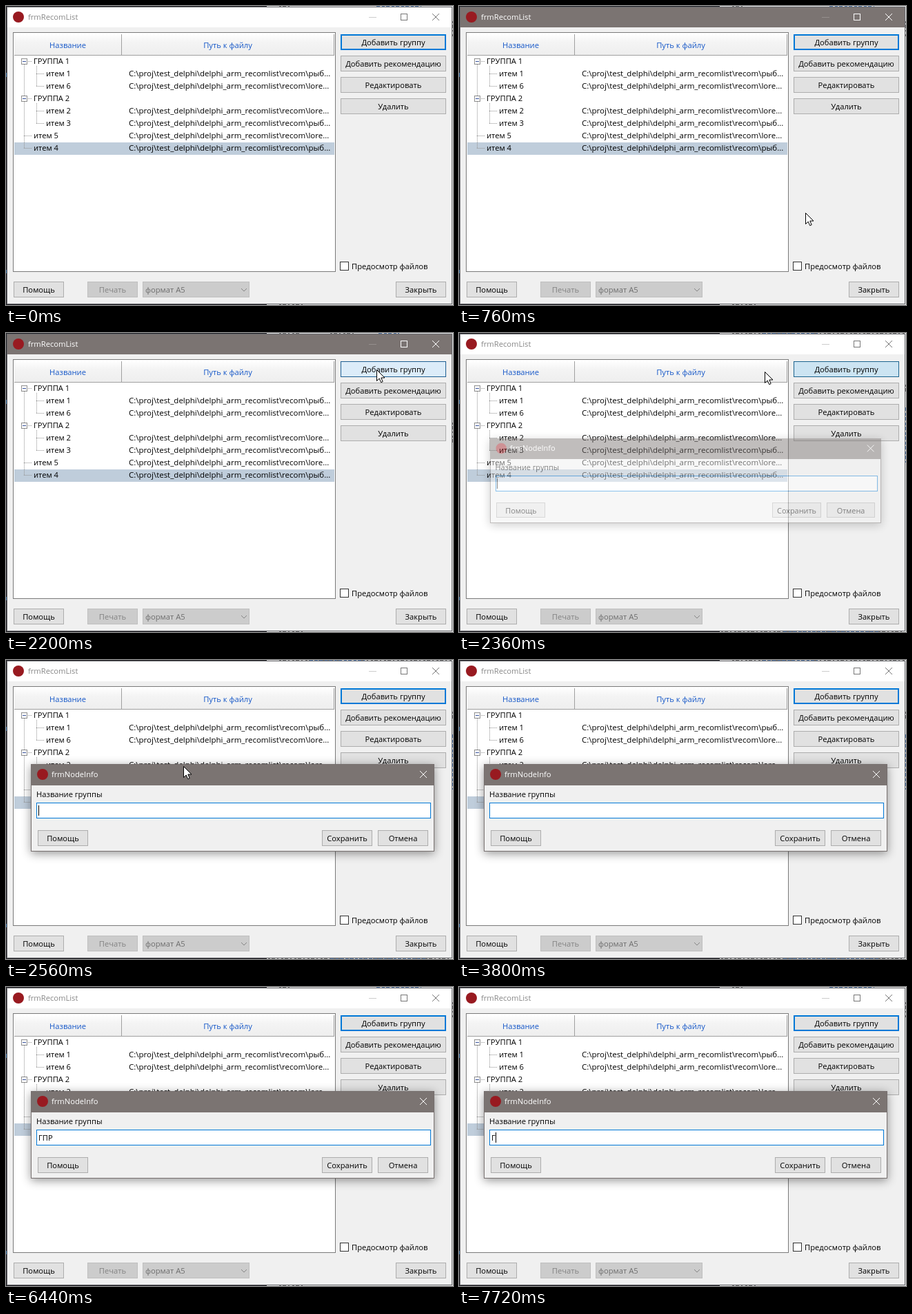
These frames come from a looping animation (648 by 434 pixels, 8 s). An HTML page:

```html
<!DOCTYPE html>
<html lang="ru">
<head>
<meta charset="utf-8">
<title>frmRecomList</title>
<style>
html, body { margin: 0; width: 100%; height: 100%; overflow: hidden; background: #f0f0f0; }
svg { display: block; width: 648px; height: 434px; font: 450 11.2px "Open Sans", "Noto Sans", sans-serif; }
rect, .thin { shape-rendering: crispEdges; }
text { white-space: pre; }
.path { font-size: 11.5px; }
.mid { text-anchor: middle; }
.line { fill: none; stroke: currentColor; }
.shadow { filter: drop-shadow(0 3px 7px rgba(0,0,0,.42)); }
</style>
</head>
<body>
<svg id="stage" viewBox="0 0 648 434"></svg>
<script>
const LOOP = 8000;
const stage = document.getElementById('stage');
const $ = id => document.getElementById(id);

// ---- markup helpers ----
const box = (x, y, w, h, fill, extra = '') =>
  `<rect x="${x}" y="${y}" width="${w}" height="${h}" fill="${fill}" ${extra}/>`;
const frame = (x, y, w, h, fill, stroke, extra = '') =>
  box(x + .5, y + .5, w - 1, h - 1, fill, `stroke="${stroke}" ${extra}`);
const text = (x, y, str, fill = '#000', cls = '', id = '') =>
  `<text x="${x}" y="${y}" fill="${fill}" class="${cls}" id="${id}">${str}</text>`;
const line = (d, color, extra = '') =>
  `<path d="${d}" fill="none" stroke="${color}" ${extra}/>`;
const button = (x, y, w, label, id = '', off = false) =>
  frame(x, y, w, 23, off ? '#ccc' : '#e1e1e1', off ? '#bfbfbf' : '#adadad', id && `id="${id}"`) +
  text(x + w / 2, y + 16, label, off ? '#838383' : '#000', 'mid');
const icon = (x, y) => `<circle cx="${x}" cy="${y}" r="8" fill="#981a20"/>`;
const cross = (x, y) => `<path class="line" d="M${x - 5} ${y - 5}l10 10m0-10l-10 10"/>`;

// ---- windows behind ----
function backdrop() {
  return box(0, 0, 378, 434, '#202024') + box(378, 0, 270, 434, '#e6e6e6') +
    box(0, 97, 1, 6, '#3f78ad') + box(0, 383, 1, 5, '#3f78ad') +
    line('', '#777', 'id="codeA" class="thin" stroke-dasharray="3 2 5 3 2 4"') +
    line('', '#5c7fae', 'id="codeB" class="thin" stroke-dasharray="5 3 4 2"');
}

// ---- tree list ----
const rows = [
  [0, 'ГРУППА 1'], [1, 'итем 1', 'рыб'], [1, 'итем 6', 'lore'],
  [0, 'ГРУППА 2'], [1, 'итем 2', 'lore'], [1, 'итем 3', 'рыб'],
  [0, 'итем 5', 'lore'], [0, 'итем 4', 'рыб']
];

function tree() {
  let links = 'M26.5 85V206M44.5 87V116M44.5 141V170', items = '';
  rows.forEach(([depth, name, file], i) => {
    const y = 80 + 18 * i, x = 26 + 18 * depth;
    links += `M${x} ${y + .5}h11`;
    items += text(40 + 18 * depth, y + 4, name);
    if (file) {
      items += text(178, y + 4, `C:\\proj\\test_delphi\\delphi_arm_recomlist\\recom\\${file}...`, '#000', 'path');
    } else {
      items += frame(22, y - 4, 9, 9, '#fafafa', '#919191', 'rx="1"') + box(24, y, 5, 1, '#3b56a0');
    }
  });
  return frame(10, 38, 468, 348, '#fff', '#7a7a7a') + box(12, 40, 464, 31, 'url(#head)') +
    box(12, 71, 464, 1, '#a0a0a0') + box(167, 41, 1, 30, '#a0a0a0') + box(475, 41, 1, 30, '#a0a0a0') +
    text(89.5, 61, 'Название', '#1557c8', 'mid') + text(321.5, 61, 'Путь к файлу', '#1557c8', 'mid') +
    box(12, 198, 464, 18, '#bfcddb') +
    line(links, '#929292', 'class="thin" stroke-dasharray="1 1"') + items;
}

function mainWindow() {
  const labels = ['Добавить группу', 'Добавить рекомендацию', 'Редактировать', 'Удалить'];
  return frame(1, 1, 646, 432, '#f0f0f0', '#66676b') + box(2, 2, 644, 29, '#fff', 'id="bar"') +
    icon(18, 16) + text(32, 20, 'frmRecomList', '#888', '', 'caption') +
    '<g id="sysMin"><path class="line thin" d="M526 16.5h11"/></g>' +
    '<g id="sys"><path class="line thin" d="M572.5 11.5h9v9h-9z"/>' + cross(623, 16) + '</g>' +
    tree() +
    labels.map((s, i) => button(485, 41 + 31 * i, 153, s, 'btn' + i)).join('') +
    frame(486, 42, 151, 21, 'none', '#0078d7', 'id="ring"') +
    frame(484, 371, 13, 13, '#fff', '#333') + text(501, 382, 'Предосмотр файлов') +
    button(11, 400, 73, 'Помощь') + button(118, 400, 73, 'Печать', '', true) +
    frame(198, 400, 155, 23, '#ccc', '#bfbfbf') + text(202, 416, 'формат А5', '#6d6d6d') +
    line('M341 410l4 4 4-4', '#858585') + button(565, 400, 73, 'Закрыть');
}

function dialog() {
  return '<g id="dialog">' + box(36, 151, 585, 127, '#777', 'class="shadow"') +
    frame(36, 151, 585, 127, '#f0f0f0', '#77706f') + box(37, 152, 583, 30, '#7b7472') +
    icon(53, 166) + text(66, 170, 'frmNodeInfo', '#fff') + `<g color="#fff">${cross(605, 166)}</g>` +
    text(44, 199, 'Название группы') + frame(44, 207, 572, 23, '#fff', '#0078d7') +
    text(47, 223, '', '#000', '', 'entry') + box(47, 211, 1, 15, '#000', 'id="caret"') +
    button(46, 247, 73, 'Помощь') + button(458, 247, 73, 'Сохранить') + button(539, 247, 73, 'Отмена') + '</g>';
}

stage.innerHTML =
  '<defs><linearGradient id="head" x2="0" y2="1"><stop stop-color="#fff"/>' +
  '<stop offset=".4" stop-color="#f4f4f4"/><stop offset="1" stop-color="#eee"/></linearGradient></defs>' +
  backdrop() + mainWindow() + dialog() +
  '<path id="arrow" d="M-.5.5V16.5L3.2 13 5.7 18.7 8.2 17.6 5.8 12H11Z" fill="#fff" stroke="#000"/>' +
  '<path id="beam" class="thin" d="M0 .5h3m2 0h3M4 1v14M0 15.5h3m2 0h3" fill="none" stroke="#000"/>';

// ---- timeline ----
const last = (table, t) => table.filter(row => row[0] <= t).pop();

// time, x, y of the pointer tip
const track = [
  [480, 484, 440], [720, 503, 300], [960, 519, 155], [1200, 527, 75],
  [1440, 540, 49], [1760, 538, 53], [2200, 538, 53], [2280, 500, 53], [2360, 444, 56],
  [2440, 362, 94], [2560, 258, 154], [2640, 231, 184], [2720, 213, 206], [2800, 206, 219], [2840, 204, 221]
];
// time, typed text, caret x (0 = blinked off)
const typing = [
  [0, '', 47], [3800, '', 0], [4280, '', 47], [4800, '', 0], [5080, 'Г', 53], [5200, 'ГП', 62],
  [5720, 'ГП', 0], [5920, 'ГПР', 69], [6440, 'ГПР', 0], [7000, 'ГПР', 69], [7520, 'ГПР', 0],
  [7600, 'ГП', 62], [7720, 'Г', 53]
];
// time, slivers of code visible around the window
const peeks = [
  [0, 'M396 .5h16M396 433.5h34M647.5 22v22', 'M537 .5h65'],
  [1280, 'M396 .5h30M470 .5h35M396 433.5h34M647.5 130v30', 'M540 .5h30'],
  [2280, 'M396 .5h250M380 433.5h262M647.5 75v12', 'M440 .5h80M470 433.5h140M647.5 108v80'],
  [5080, 'M396 .5h14M396 433.5h10', ''],
  [5360, 'M396 .5h16M396 433.5h34M647.5 22v22', 'M537 .5h65']
];

const snap = t => {
  const start = t < 2040 ? 0 : t < 2480 ? 2040 : t < 2840 ? 2480 : 2840;
  return start + Math.floor((t - start) / 80) * 80;
};

function pointer(t) {
  const i = track.findIndex(p => p[0] > t);
  if (i === 0) return null;
  if (i < 0) return track[track.length - 1].slice(1);
  const [t0, x0, y0] = track[i - 1], [t1, x1, y1] = track[i], k = (t - t0) / (t1 - t0);
  return [Math.round(x0 + (x1 - x0) * k), Math.round(y0 + (y1 - y0) * k)];
}

const set = (id, attrs) => { for (const k in attrs) $(id).setAttribute(k, attrs[k]); };
const show = (id, on) => set(id, { visibility: on ? 'visible' : 'hidden' });

function paintButtons(t) {
  const skin = Array.from({ length: 4 }, () => ['#e1e1e1', '#adadad']);
  if (t >= 1040 && t < 1280) skin[3] = skin[2] = ['#e2e4e7', '#97a9b7'];
  if (t >= 1040 && t < 1120) skin[2] = ['#e5f1fb', '#0078d7'];
  if (t >= 1120 && t < 1280) skin[1] = ['#e3eaf1', '#86a8c2'];
  const over = t >= 1280 && t < 2440;
  skin[0] = !over ? ['#e1e1e1', '#0078d7'] :
    t < 2120 ? ['#e5f1fb', '#0078d7'] :
    t < 2280 ? ['#dcecf9', '#1f5f93'] : ['#cce4f2', '#1c648f'];
  skin.forEach(([fill, stroke], i) => set('btn' + i, { fill, stroke }));
  show('ring', !over);
}

function draw(now) {
  const raw = now % LOOP, t = snap(raw);

  const active = raw >= 400 && t < 2280;
  set('bar', { fill: active ? '#7b7472' : '#fff' });
  set('caption', { fill: active ? '#fff' : '#888' });
  set('sys', { color: active ? '#fff' : '#777' });
  set('sysMin', { color: active ? '#958f8d' : '#ccc' });
  paintButtons(t);

  const [, codeA, codeB] = last(peeks, raw);
  set('codeA', { d: codeA });
  set('codeB', { d: codeB });

  const k = Math.min(1, Math.max(0, (t - 2280) / 200));
  show('dialog', t >= 2360);
  set('dialog', {
    opacity: k < 1 ? .15 + .8 * k : 1,
    transform: `translate(328 214.5) scale(${.95 + .05 * k}) translate(-328 -214.5)`
  });

  const [, typed, caretX] = last(typing, raw);
  $('entry').textContent = typed;
  set('caret', { x: caretX, opacity: caretX ? 1 : 0 });

  const pos = pointer(t), inEdit = t >= 2720 && pos && pos[1] > 210;
  show('arrow', pos && !inEdit);
  show('beam', inEdit && raw < 3240);
  if (pos) {
    set('arrow', { transform: `translate(${pos})` });
    set('beam', { transform: `translate(${pos[0] - 4} ${pos[1] - 8})` });
  }
}

function tick() {
  draw(performance.now());
  requestAnimationFrame(tick);
}
tick();
</script>
</body>
</html>
```
